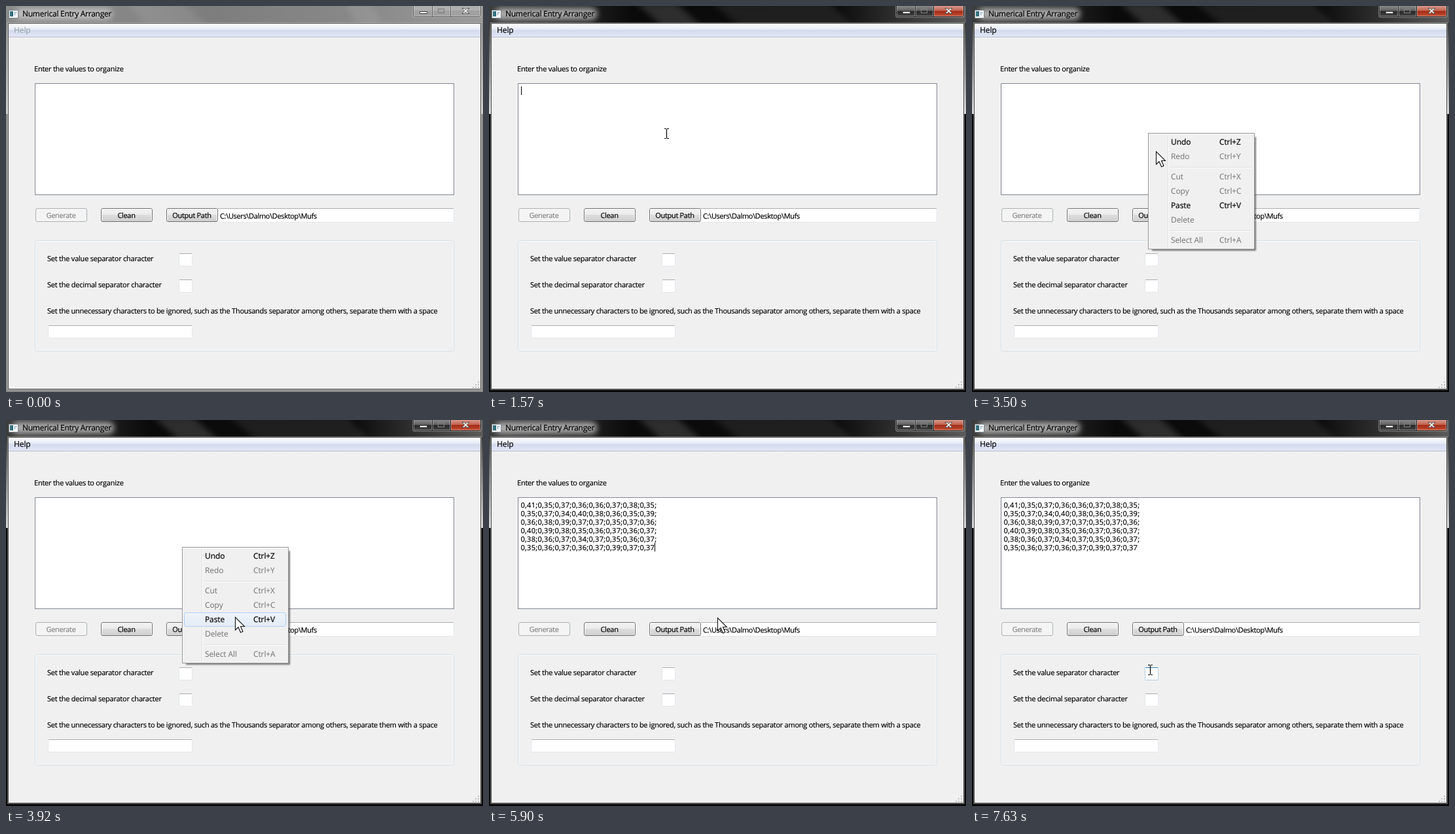
Animation of 729x590 px, one loop 8 s. Source, as an HTML page:

```html
<!DOCTYPE html>
<html lang="en">
<head>
<meta charset="utf-8">
<title>Numerical Entry Arranger</title>
<style>
html, body { margin: 0; width: 100%; height: 100%; overflow: hidden; background: #f0f0f0; }
svg { display: block; }
text { font: 11px "Open Sans", "Noto Sans", sans-serif; letter-spacing: -.22px; text-rendering: geometricPrecision; white-space: pre; stroke: #000; stroke-width: .2px; }
.crisp { shape-rendering: crispEdges; }
.ui text, text.ui { font-size: 12px; letter-spacing: -.1px; }
.mid text { text-anchor: middle; letter-spacing: -.32px; }
.data text { letter-spacing: .3px; }
.off, .off text { fill: #838383; stroke: #838383; }
.menu .off text { fill: #707070; stroke: none; }
.btn { stroke: #707070; fill: url(#face); }
.edit { fill: #fff; stroke: #e2e6eb; }
.focus { fill: none; stroke: #b5cfe7; }

/* every change is a hard step on one 8 s clock */
.t { animation: 8s step-end infinite; opacity: 0; }
.idle { animation-name: idle; }
.active { animation-name: active; }
.menu { animation-name: menu; }
.shade { animation-name: shade; }
.paste { animation-name: paste; }
.data { animation-name: data; }
.caret1 { animation-name: caret1; }
.caret2 { animation-name: caret2; }
.caret3 { animation-name: caret3; }
.hotEdit { animation-name: hotEdit; }
.hotBtn { animation-name: hotBtn; }
.hotField { animation-name: hotField; }
.arrow { animation-name: arrow; }
.beam { animation-name: beam; }
.pointer { animation: move 8s step-end infinite; }

@keyframes idle { 0% { opacity: 1 } 19.625% { opacity: 0 } }
@keyframes active { 0% { opacity: 0 } 19.625%, 100% { opacity: 1 } }
@keyframes menu { 0% { opacity: 0 } 37.25% { opacity: .4 } 38.25% { opacity: .75 } 39.25% { opacity: 1 } 57.5% { opacity: .3 } 58.5% { opacity: 0 } }
@keyframes shade { 0%, 57.5% { opacity: 0 } 37.25% { opacity: 1 } }
@keyframes paste { 0%, 46.88%, 57.5% { opacity: 0 } 45.88%, 48% { opacity: 1 } }
@keyframes data { 0% { opacity: 0 } 57.5%, 100% { opacity: 1 } }
@keyframes caret1 { 0%, 25.375%, 37.25% { opacity: 0 } 19.625%, 32.25% { opacity: 1 } }
@keyframes caret2 { 0%, 64.25%, 77.88%, 87.75% { opacity: 0 } 57.5%, 70.875%, 83.88% { opacity: 1 } }
@keyframes caret3 { 0%, 94.375% { opacity: 0 } 87.75% { opacity: 1 } }
@keyframes hotEdit { 0%, 76.88% { opacity: 0 } 76% { opacity: 1 } }
@keyframes hotBtn { 0%, 77.88% { opacity: 0 } 76.88% { opacity: 1 } }
@keyframes hotField { 0% { opacity: 0 } 79.75%, 100% { opacity: 1 } }
@keyframes arrow { 0%, 7.2%, 76%, 79.75% { opacity: 0 } 6.25%, 37.25%, 76.88% { opacity: 1 } }
@keyframes beam { 0%, 37.25%, 76.88% { opacity: 0 } 7.2%, 76%, 79.75%, 100% { opacity: 1 } }
@keyframes move {
  0%, 6.25% { transform: translate(687px, 206px) }
  7.2% { transform: translate(660px, 216px) }
  8.15% { transform: translate(600px, 219px) }
  9.1% { transform: translate(520px, 214px) }
  10.05% { transform: translate(440px, 207px) }
  11% { transform: translate(375px, 202px) }
  12% { transform: translate(325px, 199px) }
  13% { transform: translate(292px, 197px) }
  13.95% { transform: translate(277px, 196px) }
  14.875% { transform: translate(271px, 195px) }
  37.25% { transform: translate(269px, 194px) }
  42.75% { transform: translate(268px, 199px) }
  43.75% { transform: translate(281px, 222px) }
  44.88% { transform: translate(306px, 262px) }
  45.88% { transform: translate(333px, 303px) }
  46.88% { transform: translate(348px, 322px) }
  48% { transform: translate(350px, 310px) }
  49% { transform: translate(350px, 301px) }
  73.75% { transform: translate(349px, 302px) }
  75% { transform: translate(346px, 305px) }
  76% { transform: translate(340px, 315px) }
  76.88% { transform: translate(321px, 325px) }
  77.88% { transform: translate(303px, 341px) }
  78.88% { transform: translate(288px, 362px) }
  79.75% { transform: translate(278px, 381px) }
  80.75% { transform: translate(273px, 388px) }
  82% { transform: translate(272px, 392px) }
  83% { transform: translate(272px, 394px) }
  83.88% { transform: translate(272px, 391px) }
  84.88% { transform: translate(272px, 387px) }
  87.75% { transform: translate(272px, 386px) }
  94.375% { transform: translate(272px, 384px) }
  95.375%, 100% { transform: translate(272px, 382px) }
}
</style>
</head>
<body>
<svg width="729" height="590" viewBox="0 0 729 590">
  <defs>
    <linearGradient id="face" x2="0" y2="1">
      <stop stop-color="#f3f3f3"/><stop offset=".5" stop-color="#ebebeb"/>
      <stop offset=".5" stop-color="#dddddd"/><stop offset="1" stop-color="#cfcfcf"/>
    </linearGradient>
    <linearGradient id="hot" x2="0" y2="1">
      <stop stop-color="#eaf6fd"/><stop offset=".5" stop-color="#d9f0fc"/>
      <stop offset=".5" stop-color="#bee6fd"/><stop offset="1" stop-color="#a7d9f5"/>
    </linearGradient>
    <linearGradient id="bar" x2="0" y2="1">
      <stop stop-color="#fdfeff"/><stop offset=".45" stop-color="#e5eaf5"/>
      <stop offset=".5" stop-color="#d4dbed"/><stop offset="1" stop-color="#e1e6f6"/>
    </linearGradient>
    <linearGradient id="pick" x2="0" y2="1">
      <stop stop-color="#eff3f9"/><stop offset="1" stop-color="#e3ecf7"/>
    </linearGradient>
    <linearGradient id="idleTop">
      <stop stop-color="#8b8b8b"/><stop offset=".3" stop-color="#858585"/>
      <stop offset=".42" stop-color="#7d7d7d"/><stop offset=".75" stop-color="#898989"/><stop offset="1" stop-color="#9a9a9a"/>
    </linearGradient>
    <linearGradient id="liveTop">
      <stop stop-color="#3c3c3c"/><stop offset=".2" stop-color="#202020"/>
      <stop offset=".3" stop-color="#0a0a0a"/><stop offset=".73" stop-color="#0c0c0c"/>
      <stop offset=".85" stop-color="#2e2e2e"/><stop offset="1" stop-color="#5a5a5a"/>
    </linearGradient>
    <linearGradient id="idleSide" x2="0" y2="1">
      <stop stop-color="#8c8c8c"/><stop offset="1" stop-color="#cfcfcf"/>
    </linearGradient>
    <linearGradient id="liveSide" x2="0" y2="1">
      <stop stop-color="#3a3a3a"/><stop offset="1" stop-color="#d8d8d8"/>
    </linearGradient>
    <linearGradient id="darkCap" x2="0" y2="1">
      <stop stop-color="#8a8a8a"/><stop offset=".45" stop-color="#606060"/>
      <stop offset=".5" stop-color="#262626"/><stop offset="1" stop-color="#484848"/>
    </linearGradient>
    <linearGradient id="redCap" x2="0" y2="1">
      <stop stop-color="#d79a8d"/><stop offset=".45" stop-color="#c2604c"/>
      <stop offset=".5" stop-color="#a02813"/><stop offset="1" stop-color="#c8563a"/>
    </linearGradient>
    <filter id="glow" x="-20%" y="-100%" width="140%" height="300%"><feGaussianBlur stdDeviation="5"/></filter>
    <filter id="soft" x="-5%" y="-5%" width="110%" height="110%"><feGaussianBlur stdDeviation="1"/></filter>
    <clipPath id="top"><path d="M0 0H729V26H0Z"/></clipPath>
    <path id="capLine" d="M622.5 -1V13.5Q622.5 16.5 625.5 16.5H722.5Q725.5 16.5 725.5 13.5V-1M651.5 0V16M679.5 0V16" fill="none"/>
    <g id="glyphs">
      <path d="M632.5 8.5h11v3h-11z" fill="#fff" stroke="#444"/>
      <path d="M697 3.5h3.2l2.3 2.4 2.3-2.4h3.2l-3.8 4 3.8 4h-3.2l-2.3-2.4-2.3 2.4h-3.2l3.8-4z" fill="#fff" stroke="#4a4a4a"/>
    </g>
  </defs>

  <rect width="729" height="590" fill="#f0f0f0"/>

  <!-- window frame, without and with focus -->
  <g class="t idle">
    <path d="M0 0H729V590H0ZM4 27V585H725V27Z" fill="#8a8a8a" fill-rule="evenodd"/>
    <rect width="729" height="26" fill="url(#idleTop)"/>
    <g clip-path="url(#top)">
      <path d="M185 -5H270L310 31H215ZM520 -5H556L578 31H535Z" fill="#fff" opacity=".08" filter="url(#glow)"/>
    </g>
    <path d="M0 26h3v139H0zM726 26h3v139h-3z" fill="url(#idleSide)"/>
    <rect x="14" y="4" width="148" height="16" rx="8" fill="#d4d4d4" opacity=".75" filter="url(#glow)"/>
    <path d="M623 0H725V16H623Z" fill="#a4a4a4" opacity=".8"/>
    <path d="M623 0H725V7H623Z" fill="#fff" opacity=".15"/>
    <use href="#capLine" stroke="#fff" stroke-width="3" opacity=".3"/>
    <use href="#capLine" stroke="#555"/>
    <rect x="660.5" y="4.5" width="9" height="6" fill="none" stroke="#777"/>
    <use href="#glyphs"/>
  </g>
  <g class="t active">
    <path d="M0 0H729V590H0ZM4 27V585H725V27Z" fill="#080808" fill-rule="evenodd"/>
    <rect width="729" height="26" fill="url(#liveTop)"/>
    <g clip-path="url(#top)" fill="#fff">
      <path d="M225 -5H285L325 31H265Z" opacity=".14" filter="url(#glow)"/>
      <path d="M340 -5H520L556 31H385Z" opacity=".08" filter="url(#glow)"/>
    </g>
    <path d="M0 26h3v139H0zM726 26h3v139h-3z" fill="url(#liveSide)"/>
    <rect x="10" y="3" width="155" height="18" rx="8" fill="#c9c9c9" opacity=".8" filter="url(#glow)"/>
    <rect x="623" width="56" height="16" fill="url(#darkCap)"/>
    <rect x="680" width="45" height="16" fill="url(#redCap)"/>
    <use href="#capLine" stroke="#ccc" stroke-width="3" opacity=".5"/>
    <use href="#capLine" stroke="#1c1c1c"/>
    <rect x="660.5" y="4.5" width="9" height="6" fill="none" stroke="#858585"/>
    <use href="#glyphs"/>
  </g>
  <rect x="2.5" y="25.5" width="724" height="561" fill="none" stroke="#fff" opacity=".35"/>
  <rect x="3.5" y="26.5" width="722" height="559" fill="none" stroke="#4c4c4c"/>
  <g class="crisp">
    <rect x="4" y="6" width="14" height="12" fill="#f7f9fa" stroke="#7d8790"/>
    <rect x="6" y="8" width="5" height="8" fill="#35707c"/>
    <path d="M13 9h1v5h-1zM15 9h1v2h-1z" fill="#7097bd"/>
  </g>
  <text class="ui" x="25" y="16" style="letter-spacing:-.27px">Numerical Entry Arranger</text>

  <rect x="4" y="27" width="721" height="20" fill="url(#bar)"/>
  <path class="crisp" d="M4 47.5H725" stroke="#b9bfce"/>
  <g class="ui">
    <text class="t idle" x="12" y="41" fill="#8c9c9c" style="stroke:none">Help</text>
    <text class="t active" x="12" y="41">Help</text>
  </g>
  <path class="crisp" d="M722 576h2M718 580h2m2 0h2M714 584h2m2 0h2m2 0h2" stroke="#c0c0c0" stroke-width="2" transform="translate(-1 -1)"/>

  <!-- form -->
  <text x="43" y="100">Enter the values to organize</text>
  <rect x="44.5" y="118.5" width="640" height="170" fill="#fff" stroke="#828790"/>

  <rect x="44.5" y="358.5" width="640" height="169" rx="3" fill="none" stroke="#d5dfe5"/>
  <rect x="45.5" y="359.5" width="638" height="167" rx="2" fill="none" stroke="#f8f9fa"/>
  <text x="63" y="390">Set the value separator character</text>
  <text x="63" y="430">Set the decimal separator character</text>
  <text x="63" y="470" style="letter-spacing:-.26px">Set the unnecessary characters to be ignored, such as the Thousands separator among others, separate them with a space</text>

  <rect class="edit" x="323.5" y="309.5" width="361" height="21" rx="1"/>
  <rect class="edit" x="264.5" y="378.5" width="20" height="19" rx="1"/>
  <rect class="edit" x="264.5" y="418.5" width="20" height="19" rx="1"/>
  <rect class="edit" x="64.5" y="488.5" width="220" height="19" rx="1"/>
  <path class="crisp" d="M324 309.5h360M265 378.5h19M265 418.5h19M65 488.5h219" stroke="#abadb3"/>
  <g class="t hotEdit">
    <rect class="focus" x="323.5" y="309.5" width="360" height="21" rx="1"/>
    <path d="M324 309.5h359" stroke="#5794bf"/>
  </g>
  <g class="t hotField">
    <rect class="focus" x="264.5" y="378.5" width="20" height="19" rx="1"/>
    <path d="M265 378.5h19" stroke="#3d7bad"/>
  </g>
  <text x="327" y="325" style="letter-spacing:-.34px">C:\Users\Dalmo\Desktop\Mufs</text>

  <rect x="45.5" y="309.5" width="78" height="20" rx="2.5" fill="#f4f4f4" stroke="#adb2b5"/>
  <rect class="btn" x="145.5" y="309.5" width="78" height="20" rx="2.5"/>
  <rect class="btn" x="245.5" y="309.5" width="78" height="20" rx="2.5"/>
  <path d="M147 310.5h75M247 310.5h75M146.5 311v17M246.5 311v17M222.5 311v17M322.5 311v17" stroke="#fbfbfb"/>
  <rect class="t hotBtn" x="245.5" y="309.5" width="78" height="20" rx="2.5" fill="url(#hot)" stroke="#3c7fb1"/>
  <g class="mid">
    <text class="off" x="84" y="324">Generate</text>
    <text x="184" y="324">Clean</text>
    <text x="284" y="324">Output Path</text>
  </g>

  <g class="t data">
    <text x="48.5" y="134">0,41;0,35;0,37;0,36;0,36;0,37;0,38;0,35;</text>
    <text x="48.5" y="147">0,35;0,37;0,34;0,40;0,38;0,36;0,35;0,39;</text>
    <text x="48.5" y="160">0,36;0,38;0,39;0,37;0,37;0,35;0,37;0,36;</text>
    <text x="48.5" y="173">0,40;0,39;0,38;0,35;0,36;0,37;0,36;0,37;</text>
    <text x="48.5" y="186">0,38;0,36;0,37;0,34;0,37;0,35;0,36;0,37;</text>
    <text x="48.5" y="199">0,35;0,36;0,37;0,36;0,37;0,39;0,37;0,37</text>
  </g>
  <rect class="t caret1" x="49" y="123" width="1" height="13"/>
  <rect class="t caret2" x="253" y="188" width="1" height="13"/>
  <rect class="t caret3" x="268" y="381" width="1" height="14"/>

  <!-- context menu -->
  <path class="t shade" d="M431 200h3v174H275v-3h156z" fill="#333" fill-opacity=".65" filter="url(#soft)"/>
  <g class="t menu ui">
    <rect x="269.5" y="194.5" width="162" height="177" fill="#f0f0f0" stroke="#979797"/>
    <rect x="270.5" y="195.5" width="160" height="175" fill="none" stroke="#f6f6f6"/>
    <path d="M299.5 197V370M302 246.5H428M302 343.5H428" stroke="#dfe0e0"/>
    <path d="M300.5 197V370M302 247.5H428M302 344.5H428" stroke="#fff"/>
    <rect class="t paste" x="272.5" y="294.5" width="155" height="21" rx="2.5" fill="url(#pick)" stroke="#aecff7"/>
    <text x="304" y="212">Undo</text><text x="378" y="212">Ctrl+Z</text>
    <text x="304" y="309">Paste</text><text x="378" y="309">Ctrl+V</text>
    <g class="off">
      <text x="304" y="234">Redo</text><text x="378" y="234">Ctrl+Y</text>
      <text x="304" y="265">Cut</text><text x="378" y="265">Ctrl+X</text>
      <text x="304" y="287">Copy</text><text x="378" y="287">Ctrl+C</text>
      <text x="304" y="331">Delete</text>
      <text x="304" y="362">Select All</text><text x="378" y="362">Ctrl+A</text>
    </g>
  </g>

  <g class="pointer">
    <path class="t arrow" d="M.5 .5V20L5 15.8 8.6 23.8 12 22.3 8.5 14.5H14.5Z" fill="#fff" stroke="#111" stroke-width="1.1"/>
    <path class="t beam" d="M-3 -7.5H0M1 -7.5H4M-3 7.5H0M1 7.5H4M.5 -7V7" fill="none" stroke="#000" stroke-width="1.2"/>
  </g>
</svg>
</body>
</html>
```
